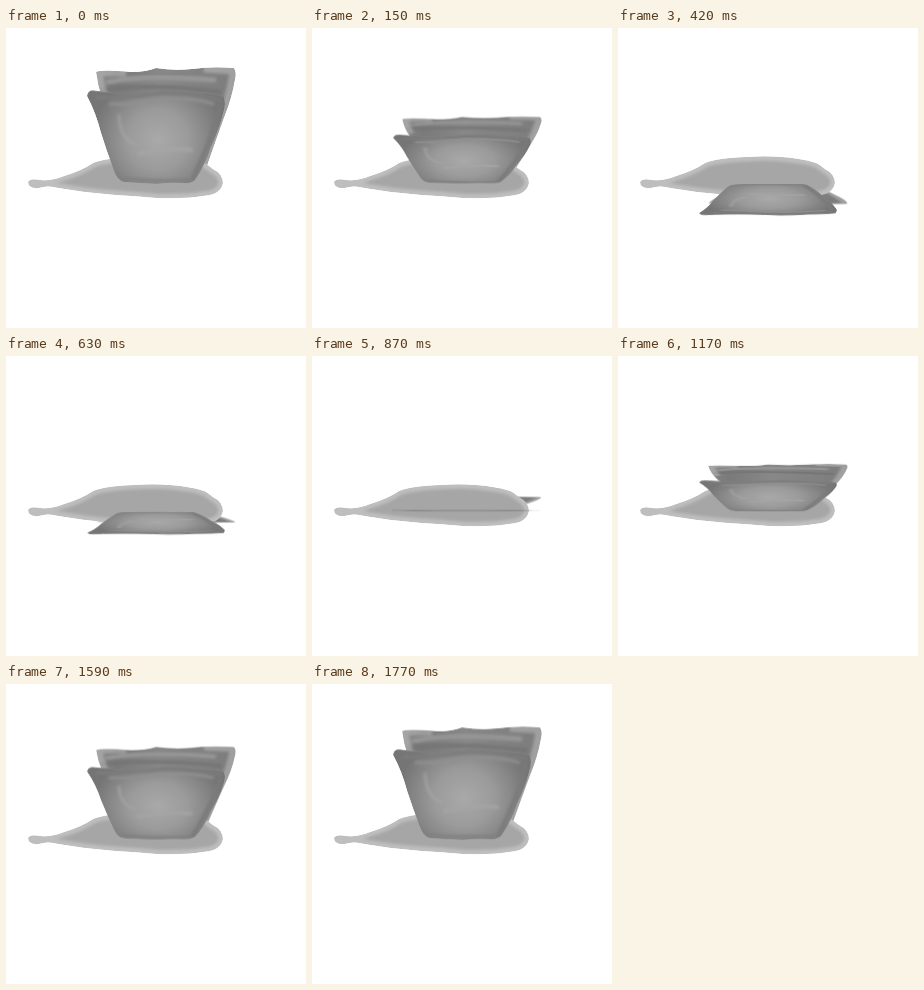
These frames come from a looping animation (300 by 300 pixels, 1800 ms). An HTML page:

```html
<!DOCTYPE html>
<html lang="en">
<head>
<meta charset="utf-8">
<title>Squashing pot</title>
<style>
  html, body { margin: 0; width: 100%; height: 100%; overflow: hidden; background: #fff; }
  svg { display: block; width: 100vw; height: 100vh; }
  .pot { transform-box: view-box; animation: squash 1800ms infinite; }
  #back { --low: -.27; transform-origin: 0 155px; }
  #front { --low: -.43; transform-origin: 0 155.7px; }
  .edge { fill: none; stroke: #fff; stroke-opacity: .27; }
  .rim { fill: none; stroke: #808080; vector-effect: non-scaling-stroke; }
  .brush { fill: none; stroke-linecap: round; }

  /* quick fall through flat, then a slow even rise, in 30 ms steps */
  @keyframes squash {
    0%   { transform: scaleY(1); animation-timing-function: steps(15, end); }
    25%  { transform: scaleY(var(--low)); animation-timing-function: steps(45, end); }
    100% { transform: scaleY(1); }
  }
</style>
</head>
<body>
<svg viewBox="0 0 300 300">
  <defs>
    <path id="backShape" d="M90 44 Q95 41 125 44 Q140 44 150 40 Q168 43 186 41 Q206 38 228 40 Q231 44 229 52 Q226 70 218 90 Q210 112 201 138 L194 155 H118 L106 90 Q93 70 90 44Z"/>
    <path id="frontShape" d="M81 68 Q82 62 88 63 Q106 66 132 65 Q148 64 162 62 Q178 62 190 65 Q208 65 217 68 Q221 74 217 86 Q213 102 205 119 Q199 138 189 152 Q185 156 176 155 Q164 154 151 156 Q132 155 118 154 Q111 152 108 143 Q101 124 95 105 Q90 85 81 68Z"/>
    <path id="shadowShape" d="M22 154 Q24 150 34 152 Q47 153 58 148 Q75 143 87 135 Q99 130 128 129 Q157 127 181 131 Q199 133 207 141 Q217 146 217 155 Q215 167 197 168 Q180 171 150 170 Q128 168 109 167 Q80 165 52 160 Q42 157 33 160 Q22 161 22 154Z"/>

    <clipPath id="backClip"><use href="#backShape"/></clipPath>
    <clipPath id="frontClip"><use href="#frontShape"/></clipPath>
    <clipPath id="shadowClip"><use href="#shadowShape"/></clipPath>

    <linearGradient id="backFill">
      <stop offset="0" stop-color="#858585"/>
      <stop offset=".15" stop-color="#7a7a7a"/>
      <stop offset=".45" stop-color="#888"/>
      <stop offset="1" stop-color="#7c7c7c"/>
    </linearGradient>
    <radialGradient id="frontFill" gradientUnits="userSpaceOnUse" cx="152" cy="112" r="66">
      <stop offset="0" stop-color="#a9a9a9"/>
      <stop offset=".45" stop-color="#9b9b9b"/>
      <stop offset="1" stop-color="#757575"/>
    </radialGradient>
    <radialGradient id="shadowFill" gradientUnits="userSpaceOnUse" r="1"
                    gradientTransform="translate(128 154) scale(90 27)">
      <stop offset="0" stop-color="#e6e6e6"/>
      <stop offset=".4" stop-color="#d4d4d4"/>
      <stop offset="1" stop-color="#a6a6a6"/>
    </radialGradient>
    <filter id="soft" x="-20%" y="-50%" width="140%" height="200%"><feGaussianBlur stdDeviation="1.4"/></filter>
  </defs>

  <g id="back" class="pot">
    <g clip-path="url(#backClip)">
      <use href="#backShape" fill="url(#backFill)"/>
      <path class="brush" d="M102 54 Q140 46 208 52" stroke="#989898" stroke-width="5" filter="url(#soft)"/>
      <path class="brush" d="M96 62 Q150 55 214 64" stroke="#757575" stroke-width="4" filter="url(#soft)"/>
      <path class="edge" d="M96 70 Q92 58 90 42 H120 M198 38 L230 40 Q229 70 199 142" stroke-width="13" filter="url(#soft)"/>
    </g>
  </g>

  <g clip-path="url(#shadowClip)">
    <use href="#shadowShape" fill="url(#shadowFill)"/>
    <use href="#shadowShape" class="edge" stroke-width="9" filter="url(#soft)"/>
  </g>

  <g id="front" class="pot">
    <g clip-path="url(#frontClip)">
      <use href="#frontShape" fill="url(#frontFill)"/>
      <g class="brush" filter="url(#soft)">
        <path d="M92 70 Q130 69 156 65 Q184 64 214 72" stroke="#7c7c7c" stroke-width="4"/>
        <path d="M104 76 Q142 77 166 71 Q190 70 207 76" stroke="#919191" stroke-width="3"/>
        <path d="M113 87 Q114 111 129 116" stroke="#a6a6a6" stroke-width="2"/>
        <path d="M133 126 Q160 119 185 122" stroke="#a5a5a5" stroke-width="4"/>
        <path d="M214 78 Q206 111 187 150" stroke="#7a7a7a" stroke-width="4"/>
        <path d="M112 150 Q145 154 184 152" stroke="#808080" stroke-width="3"/>
      </g>
    </g>
    <path class="rim" d="M82 68 Q82 62 88 63 Q106 66 132 65 Q148 64 162 62 Q178 62 190 65 Q208 65 218 69"/>
  </g>
</svg>
</body>
</html>
```
